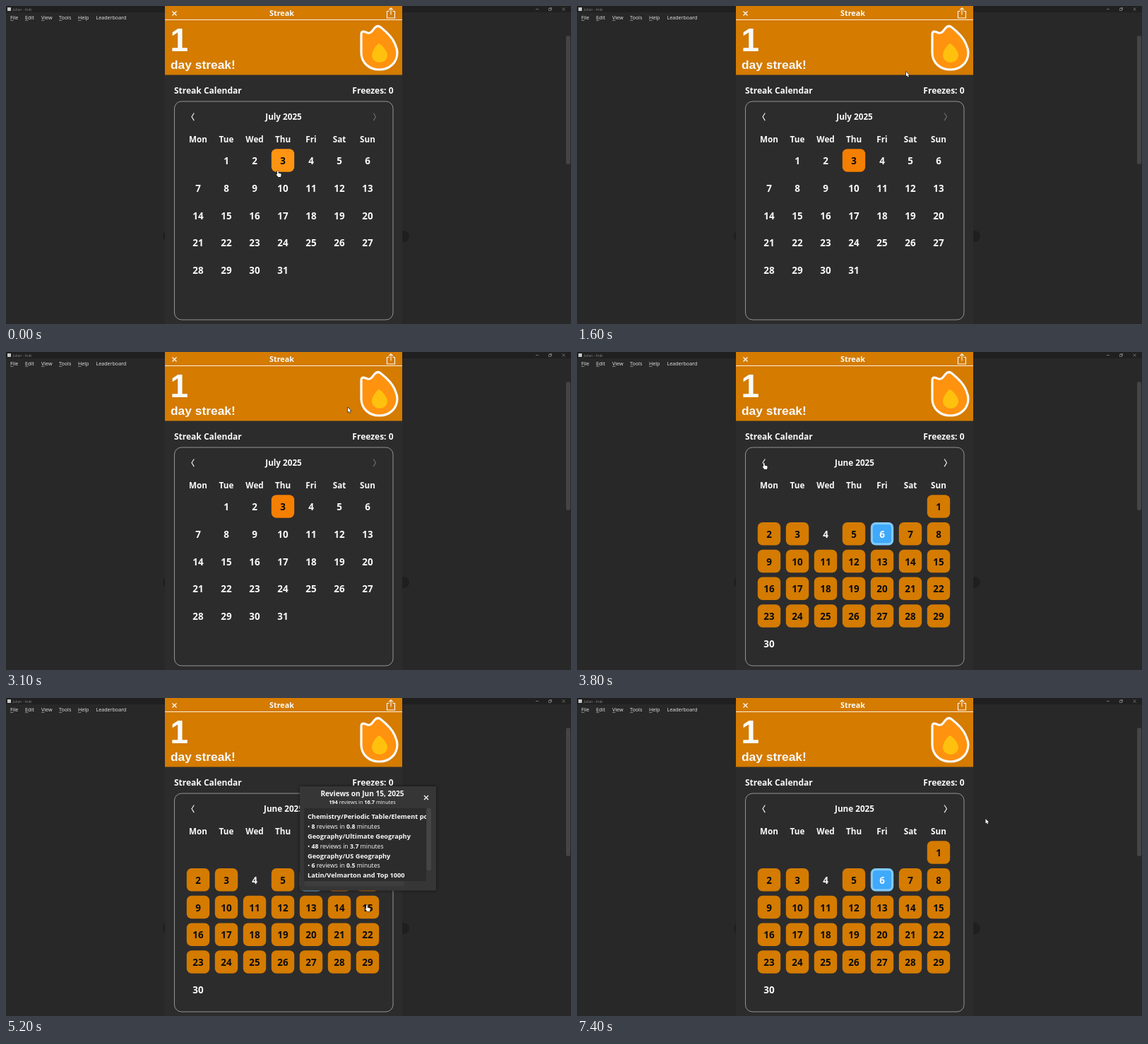
An HTML page with a canvas for the animation above (7.5 s loop, 800 by 450 pixels).

```html
<!DOCTYPE html>
<html lang="en">
<head>
<meta charset="utf-8">
<title>Streak calendar</title>
<style>
html, body { margin: 0; width: 800px; height: 450px; overflow: hidden; background: #282828; }
canvas { display: block; }
</style>
</head>
<body>
<canvas id="stage" width="800" height="450"></canvas>
<script>
const ctx = document.getElementById('stage').getContext('2d');
const LOOP = 7500, STEP = 100;
const JUNE_AT = 3800, OPEN_AT = 4800, CLOSE_AT = 7300;
const SANS = '"Open Sans", "Noto Sans", sans-serif';
const ARIAL = '"Liberation Sans", Arial, sans-serif';
const ORANGE = '#d47b00', BRIGHT = '#ff9412', PANEL = '#2c2c2d', WHITE = '#fafafa';

// Pointer tip: time, x, y
const route = [
  [0, 384, 233], [600, 440, 150], [700, 440, 150], [1600, 466, 93], [2400, 477, 85],
  [3100, 484, 78.5], [3400, 528, 45], [3700, 264, 157], [3900, 264, 157],
  [4400, 478, 300], [4600, 510, 293], [5600, 510, 293], [6500, 518, 225],
  [7100, 594, 140], [7200, 594, 140], [7300, 588, 153], [7400, 578.5, 171]
];

function pointerAt(t) {
  const i = route.findIndex(p => p[0] >= t);
  if (i <= 0) return route[0].slice(1);
  const [t0, x0, y0] = route[i - 1], [t1, x1, y1] = route[i];
  const k = (t - t0) / (t1 - t0);
  return [x0 + (x1 - x0) * k, y0 + (y1 - y0) * k];
}

function box(x, y, w, h, r, fill) {
  ctx.beginPath();
  ctx.roundRect(x, y, w, h, r);
  ctx.fillStyle = fill;
  ctx.fill();
}

function line(d, color = WHITE, width = 1) {
  ctx.strokeStyle = color;
  ctx.lineWidth = width;
  ctx.stroke(new Path2D(d));
}

function text(str, x, y, size, { weight = 700, align = 'left', color = WHITE, family = SANS } = {}) {
  ctx.font = `${weight} ${size}px ${family}`;
  ctx.textAlign = align;
  ctx.fillStyle = color;
  ctx.fillText(str, x, y);
  return ctx.measureText(str).width;
}

// Parts between asterisks are bold
function mixed(str, x, y, size, centered) {
  const parts = str.split('*');
  const weight = i => i % 2 ? 700 : 400;
  if (centered) {
    parts.forEach((part, i) => {
      ctx.font = `${weight(i)} ${size}px ${SANS}`;
      x -= ctx.measureText(part).width / 2;
    });
  }
  parts.forEach((part, i) => { x += text(part, x, y, size, { weight: weight(i) }); });
}

function drawWindow() {
  ctx.fillStyle = '#282828';
  ctx.fillRect(0, 0, 800, 450);
  ctx.fillStyle = '#202020';
  ctx.fillRect(0, 0, 800, 9);
  box(2, 2, 5, 5, 0, '#c8c8c8');
  text('Julian - Anki', 9.5, 6.7, 5, { weight: 400, color: '#858585' });
  line('M750 4.5h4 M768.5 3.5h3v3h-3z M769.5 2.5h3v3 M787.5 2.5l4 4 M791.5 2.5l-4 4', '#909090', 0.7);
  [['File', 6], ['Edit', 27], ['View', 50], ['Tools', 75], ['Help', 102], ['Leaderboard', 127.5]].forEach(([name, x], i) => {
    text(name, x, 19, 7.15, { weight: 400, color: '#e8e8e8' });
    if (i < 5) line(`M${x} 20.5h4.5`, '#bbb', 0.6);
  });
  box(793, 42, 6, 182, 3, '#454545');
  box(222, 318, 349, 16, 8, '#1f1f1f');
}

function drawHeader() {
  ctx.fillStyle = PANEL;
  ctx.fillRect(225, 0, 336, 450);
  ctx.fillStyle = ORANGE;
  ctx.fillRect(225, 0, 336, 97.5);
  line('M225 19.5h336', '#fff2dc', 1.2);
  line('M235.5 7.5l6 6 M241.5 7.5l-6 6', WHITE, 1.3);
  line('M542.5 7.5h-3v9.5h11v-9.5h-3 M545 12.5v-9.5 M542 5.7l3-3 3 3', WHITE, 1.1);
  text('Streak', 390.5, 14.3, 10.8, { align: 'center' });
  text('1', 232.5, 64, 46, { family: ARIAL });
  text('day streak!', 233, 89, 17.4, { family: ARIAL });

  const flame = 'M503 40Q503 35 508 36.5L512 38Q515.5 39 518 36L522 31Q526 26.5 530.5 30' +
    'C538 36 546 43 550 52C552 57 554 60 554 66C554 80 543 90 528.5 90C514 90 503 80 503 66Z';
  ctx.fillStyle = '#ff920f';
  ctx.fill(new Path2D(flame));
  line(flame, WHITE, 3.2);
  ctx.fillStyle = '#ffc10d';
  ctx.fill(new Path2D('M528 53C530 53 540 63 540 69.5A11 10.5 0 0 1 518 69.5C518 63 526 53 528 53Z'));
}

function drawCalendar(june, hovered) {
  text('Streak Calendar', 238, 123.8, 12);
  text('Freezes: 0', 548.5, 123.8, 12, { align: 'right' });
  ctx.beginPath();
  ctx.roundRect(238.5, 135, 309.5, 309, 10);
  ctx.strokeStyle = '#a0a0a0';
  ctx.lineWidth = 0.9;
  ctx.stroke();

  line('M266.3 151.5l-3.3 5.3 3.3 5.3', WHITE, 1.1);
  line('M520.2 151.5l3.3 5.3-3.3 5.3', june ? WHITE : '#707070', 1.1);
  text(june ? 'June 2025' : 'July 2025', 393, 160.5, 11.7, { align: 'center' });
  ['Mon', 'Tue', 'Wed', 'Thu', 'Fri', 'Sat', 'Sun'].forEach((day, i) =>
    text(day, 272 + 40 * i, 193, 11.7, { align: 'center' }));

  for (let day = 1; day <= (june ? 30 : 31); day++) {
    const [x, y] = cellCenter(day, june);
    const streak = isStreak(day, june);
    if (streak) {
      const fill = day === hovered ? BRIGHT : june ? ORANGE : '#f57f00';
      box(x - 16.2, y - 16.2, 32.4, 32.4, 7, fill);
    } else if (june && day === 6) {
      box(x - 16.2, y - 16.2, 32.4, 32.4, 7, '#80cafa');
      box(x - 13, y - 13, 26, 26, 4, '#3fa9fb');
    }
    text(day, x, y + 5.5, 13.4, { align: 'center', color: streak ? '#0b0b0b' : WHITE });
  }
}

function cellCenter(day, june) {
  const slot = day - 1 + (june ? 6 : 1);
  return [272 + 40 * (slot % 7), 218.5 + 38.75 * Math.floor(slot / 7)];
}

function isStreak(day, june) {
  return june ? ![4, 6, 30].includes(day) : day === 3;
}

function dayUnder(px, py, june) {
  for (let day = 1; day <= 30; day++) {
    const [x, y] = cellCenter(day, june);
    if (isStreak(day, june) && Math.abs(px - x) < 16 && Math.abs(py - y) < 16) return day;
  }
  return 0;
}

function drawPopup(active) {
  ctx.save();
  ctx.shadowColor = 'rgba(0,0,0,.55)';
  ctx.shadowBlur = 4;
  box(416, 125, 193, 147.5, 1, '#363636');
  ctx.restore();
  text('Reviews on Jun 15, 2025', 504.5, 139, 10.1, { align: 'center' });
  mixed('*194* reviews in *16.7* minutes', 504.5, 150.3, 7.35, true);
  line('M592 138l6 6 M598 138l-6 6', WHITE, 1.3);

  ctx.save();
  box(422, 156, 173, 103, 0, PANEL);
  ctx.clip();
  [
    ['Chemistry/Periodic Table/Element points', 8, 0.8],
    ['Geography/Ultimate Geography', 48, 3.7],
    ['Geography/US Geography', 6, 0.5],
    ['Latin/Velmarton and Top 1000', 0, 0]
  ].forEach(([deck, count, minutes], i) => {
    const y = 171 + 27.8 * i;
    text(deck, 427, y, 9.2);
    if (count) mixed(`• *${count}* reviews in *${minutes}* minutes`, 427, y + 13.8, 8.7);
  });
  ctx.restore();
  box(595.5, 156, 6.5, 88, 2, '#454545');
  box(422, 259, 142, 7.5, 3, active ? '#4c4c4c' : '#3d3d3d');
}

function drawPointer(x, y, hand) {
  const shape = hand
    ? 'M0 0.6Q0.8-.4 1.6.6V3.4L5 4.2Q5.8 4.6 5.6 6L5 9H1.4L-1.4 5.6Q-1.4 4.4 0 5.2Z'
    : 'M0 0V6.6L1.5 5.3 2.6 7.6 3.7 7 2.7 4.8H4.7Z';
  ctx.save();
  ctx.translate(x, y);
  ctx.lineJoin = 'round';
  line(shape, '#151515', 1.1);
  ctx.fillStyle = '#fff';
  ctx.fill(new Path2D(shape));
  ctx.restore();
}

function frame(now) {
  const t = Math.floor(now % LOOP / STEP) * STEP;
  const june = t >= JUNE_AT, popup = t >= OPEN_AT && t < CLOSE_AT;
  const [x, y] = pointerAt(t);
  const near = (cx, cy) => Math.hypot(x - cx, y - cy) < 9;
  const hovered = popup ? 0 : dayUnder(x, y, june);
  const waiting = popup && t <= 5600;

  drawWindow();
  drawHeader();
  drawCalendar(june, hovered);
  if (popup) drawPopup(!waiting);
  drawPointer(x, y, hovered || waiting || near(264, 157) || popup && near(595, 141));
  requestAnimationFrame(frame);
}
requestAnimationFrame(frame);
</script>
</body>
</html>
```
